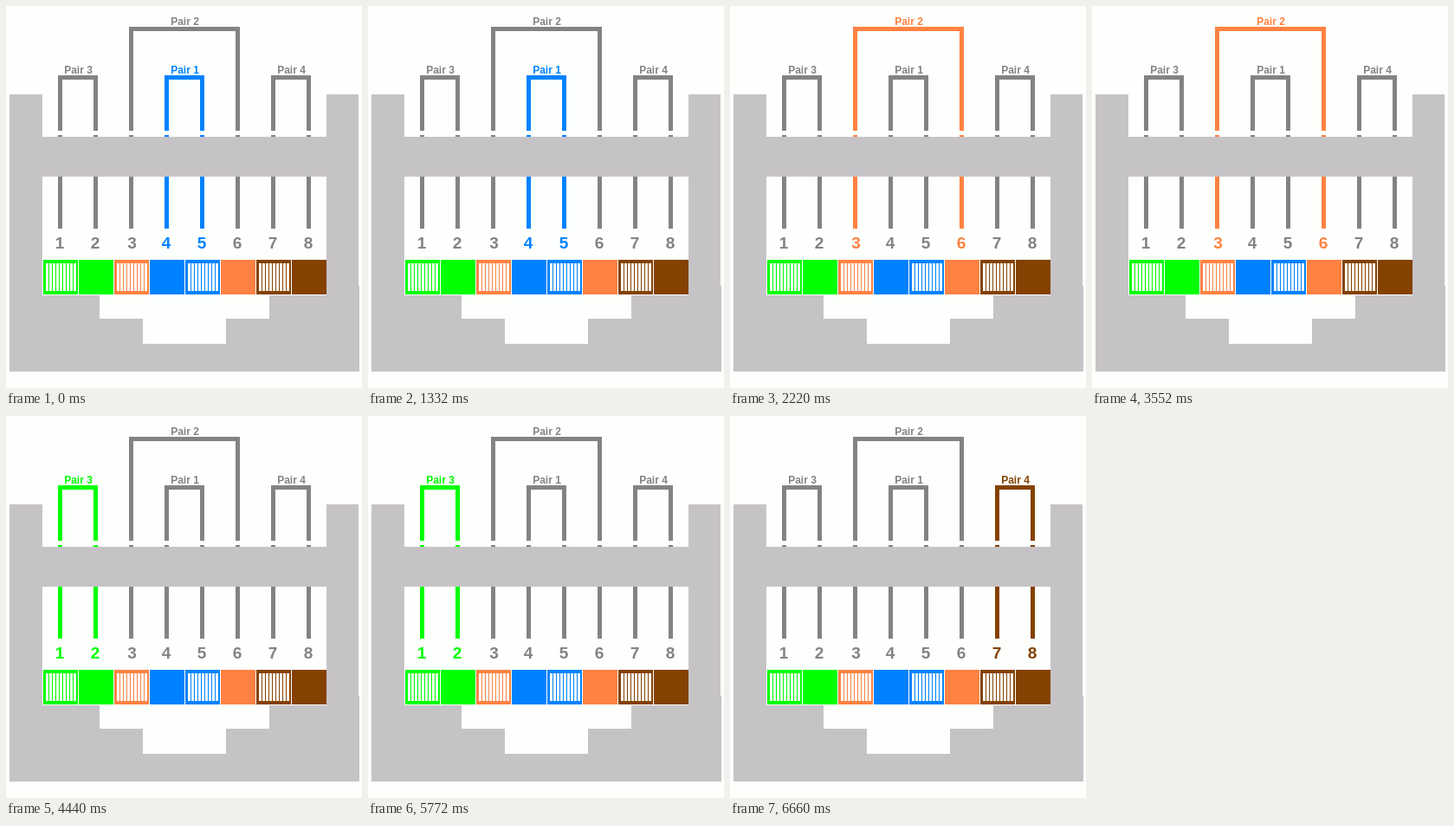
An HTML page for the animation above (8880 ms loop, 411 by 441 pixels).

```html
<!DOCTYPE html>
<html lang="en">
<head>
<meta charset="utf-8">
<title>Wire pairs</title>
<style>
  html, body { margin: 0; width: 100%; height: 100%; overflow: hidden; background: #fdfffd; }
  svg { display: block; width: 411px; height: 441px; }
  text { font-family: Arial, "Liberation Sans", sans-serif; font-weight: bold; text-anchor: middle; }
  .label { font-size: 12px; }
  .digit { font-size: 19px; }
  .pair { color: #848284; fill: currentColor; }
  .wire { fill: none; stroke: currentColor; stroke-width: 5; }
</style>
</head>
<body>
<svg id="stage" viewBox="0 0 411 441" shape-rendering="crispEdges"></svg>
<script>
const STEP = 2220;
const GREEN = '#00ff00', ORANGE = '#ff8242', BLUE = '#0082ff', BROWN = '#844100';
const PAPER = '#fdfffd', BODY = '#c6c3c6';

// In the order in which they light up
const PAIRS = [
  { name: 'Pair 1', pins: [4, 5], top: 82, color: BLUE },
  { name: 'Pair 2', pins: [3, 6], top: 26, color: ORANGE },
  { name: 'Pair 3', pins: [1, 2], top: 82, color: GREEN },
  { name: 'Pair 4', pins: [7, 8], top: 82, color: BROWN }
];
const PADS = [GREEN, GREEN, ORANGE, BLUE, BLUE, ORANGE, BROWN, BROWN];
const STRIPED = [1, 3, 5, 7];

const stage = document.getElementById('stage');

function add(parent, tag, attrs, text) {
  const el = document.createElementNS('http://www.w3.org/2000/svg', tag);
  for (const key in attrs) el.setAttribute(key, attrs[key]);
  if (text) el.textContent = text;
  return parent.appendChild(el);
}

const rect = (x, y, width, height, fill) => add(stage, 'rect', { x, y, width, height, fill });
const pinX = pin => 21.5 + pin * 41;

function drawPair({ name, pins, top }) {
  const g = add(stage, 'g', { class: 'pair' });
  const [a, b] = pins.map(pinX);
  let d = `M${a} 144V${top + 0.5}H${b}V144`;
  for (const x of [a, b]) d += `M${x} 149V257`;
  add(g, 'path', { class: 'wire', d });
  add(g, 'text', { class: 'label', x: (a + b) / 2 + 0.5, y: top - 4 }, name);
  for (const pin of pins) {
    const x = pinX(pin) + (pin === 3 ? 1 : -0.5);
    add(g, 'text', { class: 'digit', x, y: 280 }, String(pin));
  }
  return g;
}

function drawPad(color, i) {
  const x = 43 + i * 41;
  rect(x, 293, 40, 40, color);
  if (STRIPED.includes(i + 1)) {
    for (let k = 0; k < 9; k++) rect(x + 3 + k * 4, 297, 3, 32, PAPER);
  }
}

const groups = PAIRS.map(drawPair);
add(stage, 'path', {
  fill: BODY,
  d: 'M4 102H42V151H370V102H407V323H408V422H4Z' +
     'M42 197V334H108V361H158V390H254V361H304V334H370V197Z',
  'fill-rule': 'evenodd'
});
// The wires pass in front of the opening but behind the bar
groups.forEach(g => stage.appendChild(g));
rect(42, 151, 328, 46, BODY);
PADS.forEach(drawPad);

const start = performance.now();
let lit = -1;

function frame(now) {
  const next = Math.floor(Math.max(0, now - start) / STEP) % PAIRS.length;
  if (next !== lit) {
    lit = next;
    groups.forEach((g, i) => { g.style.color = i === lit ? PAIRS[i].color : ''; });
  }
  requestAnimationFrame(frame);
}
frame(start);
</script>
</body>
</html>
```
